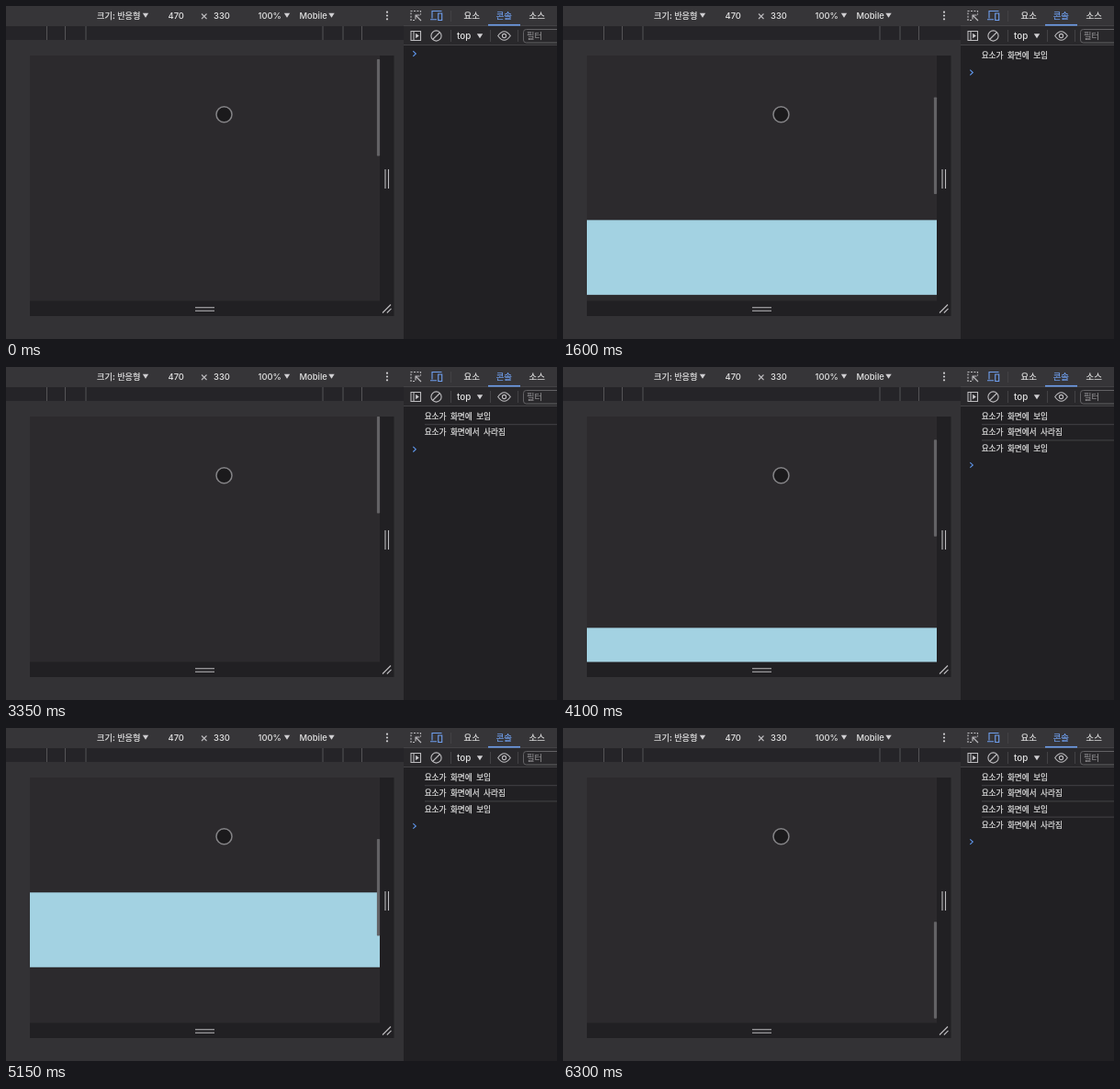
These frames come from a looping animation (600 px wide and 363 px high, 6.35 s). An HTML page:

```html
<!DOCTYPE html>
<html lang="ko">
<head>
<meta charset="utf-8">
<style>
  html, body { margin: 0; width: 100%; height: 100%; overflow: hidden; background: #212023; }
  svg { display: block; }
  text { font: 500 9.4px Inter, "Noto Sans CJK KR", "Noto Sans CJK", sans-serif; fill: #e3e3e3; }
  .ko { stroke: #e3e3e3; stroke-width: .2; }
  .log { font: 8.65px "Noto Sans CJK KR", "Noto Sans CJK", sans-serif; word-spacing: 2px; }
  .line { fill: none; stroke: #bdbcbf; stroke-width: 1.1; }
  .rule { fill: none; stroke: #434245; }
  .blue { stroke: #6f9fee; }
  .arrow { fill: #d0cfd2; }
</style>
</head>
<body>
<svg width="600" height="363" viewBox="0 0 600 363">
  <defs>
    <clipPath id="view"><rect x="26" y="54" width="381" height="267.5"/></clipPath>
    <path id="down" class="arrow" d="M-3.2 -2.3h6.4L0 2.8z"/>
  </defs>

  <!-- device toolbar and ruler -->
  <rect width="433" height="363" fill="#333235"/>
  <rect width="433" height="22" fill="#363538"/>
  <rect y="22" width="433" height="15" fill="#252428"/>
  <path class="rule" style="stroke:#555457" d="M44.5 22v15M64.5 22v15M87 22v15M345 22v15M367 22v15M387.5 22v15"/>
  <text class="ko" x="99" y="13.6" style="font-size:9.2px">크기: 반응형</text>
  <text x="176.5" y="13.6">470</text>
  <path class="line" d="M213 8.5l5.5 5.5M218.5 8.5l-5.5 5.5"/>
  <text x="226" y="13.6">330</text>
  <text x="274.5" y="13.6">100%</text>
  <text x="319.5" y="13.6">Mobile</text>
  <use href="#down" x="152" y="10"/>
  <use href="#down" x="306" y="10"/>
  <use href="#down" x="354.5" y="10"/>
  <g class="arrow">
    <circle cx="415" cy="6.7" r="1.1"/><circle cx="415" cy="10.5" r="1.1"/><circle cx="415" cy="14.3" r="1.1"/>
  </g>

  <!-- emulated screen -->
  <rect x="26" y="54" width="396.5" height="284" fill="#212023"/>
  <rect x="26" y="54" width="381" height="267.5" fill="#2c2a2d"/>
  <g clip-path="url(#view)">
    <rect id="box" x="26" width="381" height="81.5" fill="#a3d2e2"/>
  </g>
  <rect id="thumb" x="403.9" width="3.2" height="105.5" rx=".8" fill="#636265"/>
  <circle cx="237.5" cy="118.3" r="8.5" fill="#1b1a1c" stroke="#858487" stroke-width="1.5"/>
  <path class="line" d="M413 178v21M416.5 178v21M206 328.7h21M206 332.3h21M410 334.5l9-9M414.8 334.5l4.7-4.7"/>

  <!-- developer tools -->
  <rect x="433" width="167" height="363" fill="#212023"/>
  <rect x="433" width="167" height="21.5" fill="#363538"/>
  <rect x="433" y="21.5" width="167" height="21" fill="#29282b"/>
  <path class="rule" d="M433 21.5h167M433 42.5h167M484.5 5v12M484.5 26v13M527.5 26v13M557.5 26v13"/>
  <path class="line" stroke-dasharray="2 1.4" d="M445 15.5h-4v-10h10.5v4"/>
  <path class="line" d="M446 14.5v-4.5h4.5M446.5 10.5l5.5 5.5"/>
  <path class="line blue" d="M464 13.5v-8h10.5M462 14.8h7M470.7 8h4v7.5h-4z"/>
  <text class="ko" x="498.5" y="13.8">요소</text>
  <text class="ko blue" x="533.7" y="13.8" style="fill:#6f9fee">콘솔</text>
  <text class="ko" x="569.5" y="13.8">소스</text>
  <rect x="525" y="19.9" width="35" height="1.6" fill="#6f9fee"/>

  <path class="line" d="M441 27.5h10.5v10h-10.5zM444 27.5v10"/>
  <path class="arrow" d="M446.2 29.8v5.4l3.6-2.7z"/>
  <circle class="line" cx="468.5" cy="32.5" r="5.6"/>
  <path class="line" d="M472.5 28.5l-8 8"/>
  <text x="491" y="35.8" style="font-size:9.8px">top</text>
  <use href="#down" x="516" y="32.5"/>
  <path class="line" d="M535.7 32.5q6.8-9.6 13.6 0q-6.8 9.6-13.6 0z"/>
  <circle class="line" cx="542.5" cy="32.5" r="2.1"/>
  <rect class="rule" x="563.5" y="25.5" width="50" height="14.5" rx="3" style="stroke:#636265"/>
  <text x="567" y="36" style="font-size:9.2px;fill:#9b9a9d">필터</text>

  <g id="logs"></g>
  <path id="prompt" class="line" style="stroke:#5f97ee" d="M443.3 -2.8l3 2.8l-3 2.8"/>
</svg>
<script>
  const LOOP = 6350, STEP = 50, TOP = 54, RATIO = 2.52, BOX_TOP = 348;
  const ROW = 17.2, SHOWN = '요소가 화면에 보임', GONE = '요소가 화면에서 사라짐';

  // Each flick: start time, end time, scroll offset it reaches.
  const START_OFFSET = 10;
  const flicks = [
    [0, 1050, 66], [1350, 1700, 120], [1800, 2050, 108.5], [2450, 3350, 0],
    [3800, 4450, 96], [4450, 4750, 129], [5050, 5600, 270], [5750, 6300, 396]
  ];

  const $ = id => document.getElementById(id);
  const box = $('box'), thumb = $('thumb'), prompt = $('prompt');
  const easeOut = u => Math.sin(Math.min(1, Math.max(0, u)) * Math.PI / 2);
  const isVisible = offset => offset > 27 && offset < 375;

  function offsetAt(t) {
    return flicks.reduce((from, [start, end, to]) =>
      from + (to - from) * easeOut((t - start) / (end - start)), START_OFFSET);
  }

  // A message is logged whenever the box enters or leaves the screen.
  const messages = [];
  for (let t = STEP; t < LOOP; t += STEP) {
    const now = isVisible(offsetAt(t));
    if (now !== isVisible(offsetAt(t - STEP))) messages.push({ time: t, text: now ? SHOWN : GONE });
  }

  $('logs').innerHTML = messages.map(({ text }, i) => {
    const y = TOP + ROW * i;
    const rule = i ? `<path class="rule" d="M456 ${y - 8.5}H600"/>` : '';
    return `<g>${rule}<text class="log ko" x="455.7" y="${y + 3.2}">${text}</text></g>`;
  }).join('');
  const rows = [...$('logs').children];

  function draw(t) {
    const offset = offsetAt(t);
    const count = messages.filter(({ time }) => t >= time).length;
    box.setAttribute('y', BOX_TOP - offset);
    thumb.setAttribute('y', TOP + offset / RATIO);
    rows.forEach((row, i) => row.setAttribute('visibility', i < count ? 'visible' : 'hidden'));
    prompt.setAttribute('transform', `translate(0 ${count ? 55.3 + ROW * count : 52})`);
  }

  const start = performance.now();
  function tick() {
    const t = (performance.now() - start) % LOOP;
    draw(Math.floor(t / STEP) * STEP);
    requestAnimationFrame(tick);
  }
  tick();
</script>
</body>
</html>
```
